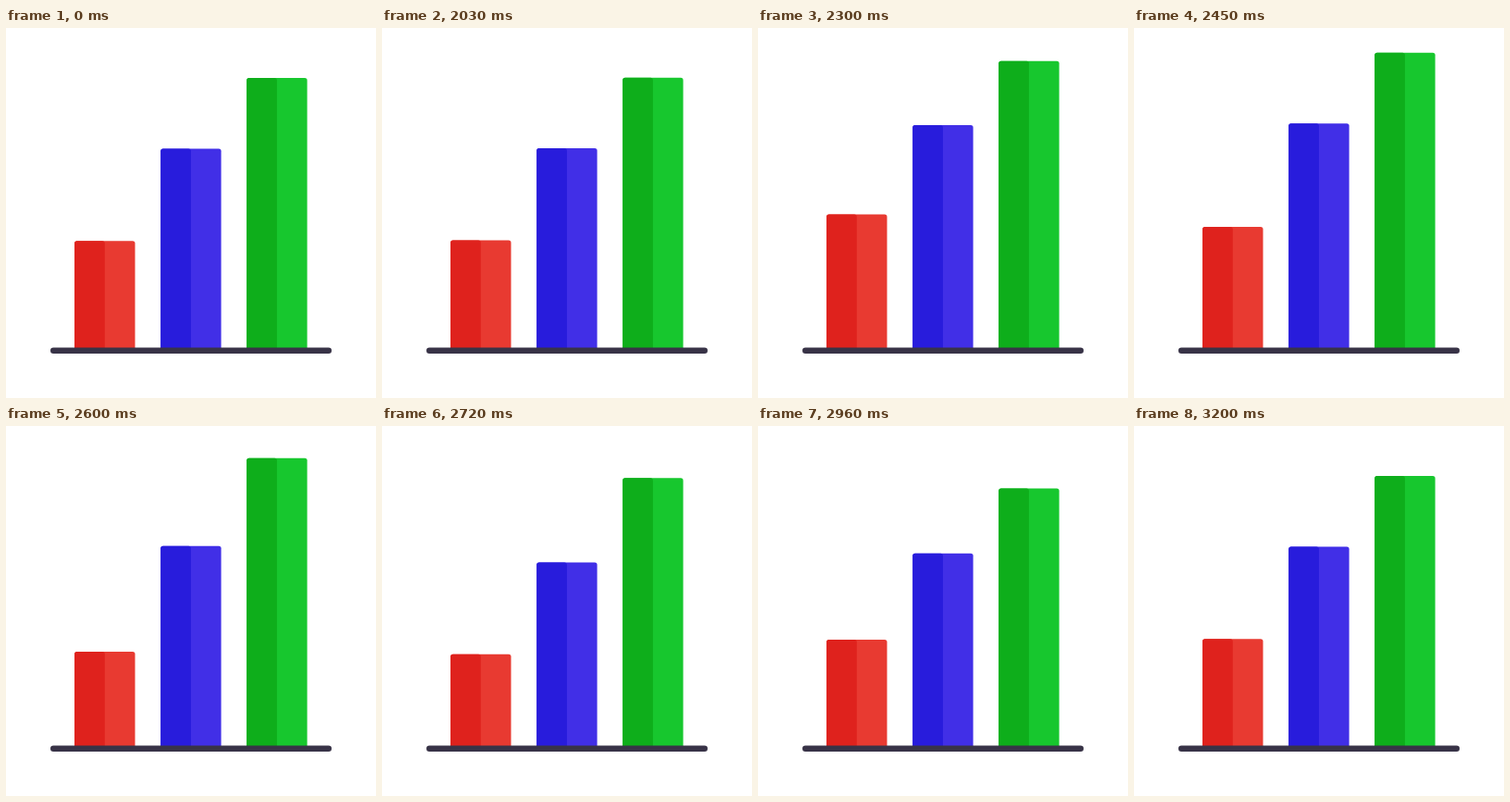
These frames come from a looping animation (400 by 400 pixels, 3.23 s). An HTML page:

```html
<!DOCTYPE html>
<html lang="en">
<head>
<meta charset="utf-8">
<title>Bar chart</title>
<style>
  html, body { margin: 0; width: 100%; height: 100%; overflow: hidden; background: #fff; }
  svg { display: block; width: 100%; height: 100%; }
</style>
</head>
<body>
<svg viewBox="0 0 400 400">
  <defs><clipPath id="floor"><rect width="400" height="348"/></clipPath></defs>
  <g id="bars" clip-path="url(#floor)"></g>
  <rect x="48" y="345.4" width="304" height="6.6" rx="3.3" fill="#383347"/>
</svg>
<script>
  const LOOP = 3230, HOLD = 2000, STEP = 30;

  // tops: rest, peak, dip; keys: steps at which peak, dip and rest are reached
  const bars = [
    { x: 74.1, dark: '#df221d', light: '#e83a31', tops: [230.2, 200.8, 248.1], keys: [11, 22, 33.4] },
    { x: 167.2, dark: '#281cdc', light: '#412fe7', tops: [130.6, 100.4, 148.5], keys: [13.3, 25, 37.3] },
    { x: 260.2, dark: '#0eae1b', light: '#17c72e', tops: [54.1, 25.9, 71.2], keys: [16.6, 28.6, 40] }
  ];

  const root = document.getElementById('bars');

  function addRect(parent, x, width, fill) {
    const r = document.createElementNS(root.namespaceURI, 'rect');
    const attrs = { x, width, fill, height: 400, rx: 2.6 };
    for (const k in attrs) r.setAttribute(k, attrs[k]);
    parent.appendChild(r);
  }

  for (const b of bars) {
    b.el = document.createElementNS(root.namespaceURI, 'g');
    addRect(b.el, b.x, 65.4, b.light);
    addRect(b.el, b.x, 32.7, b.dark);
    root.appendChild(b.el);
  }

  const ease = s => s * s * (3 - 2 * s);

  function topAt({ tops, keys }, n) {
    let from = 0;
    for (let i = 0; i < 3; i++) {
      if (n < keys[i]) {
        const s = ease((n - from) / (keys[i] - from));
        return tops[i] + (tops[(i + 1) % 3] - tops[i]) * s;
      }
      from = keys[i];
    }
    return tops[0];
  }

  const start = performance.now();

  function draw() {
    const t = (performance.now() - start) % LOOP;
    const n = Math.max(0, Math.floor((t - HOLD) / STEP));
    for (const b of bars) b.el.setAttribute('transform', `translate(0 ${topAt(b, n).toFixed(2)})`);
    requestAnimationFrame(draw);
  }
  draw();
</script>
</body>
</html>
```
